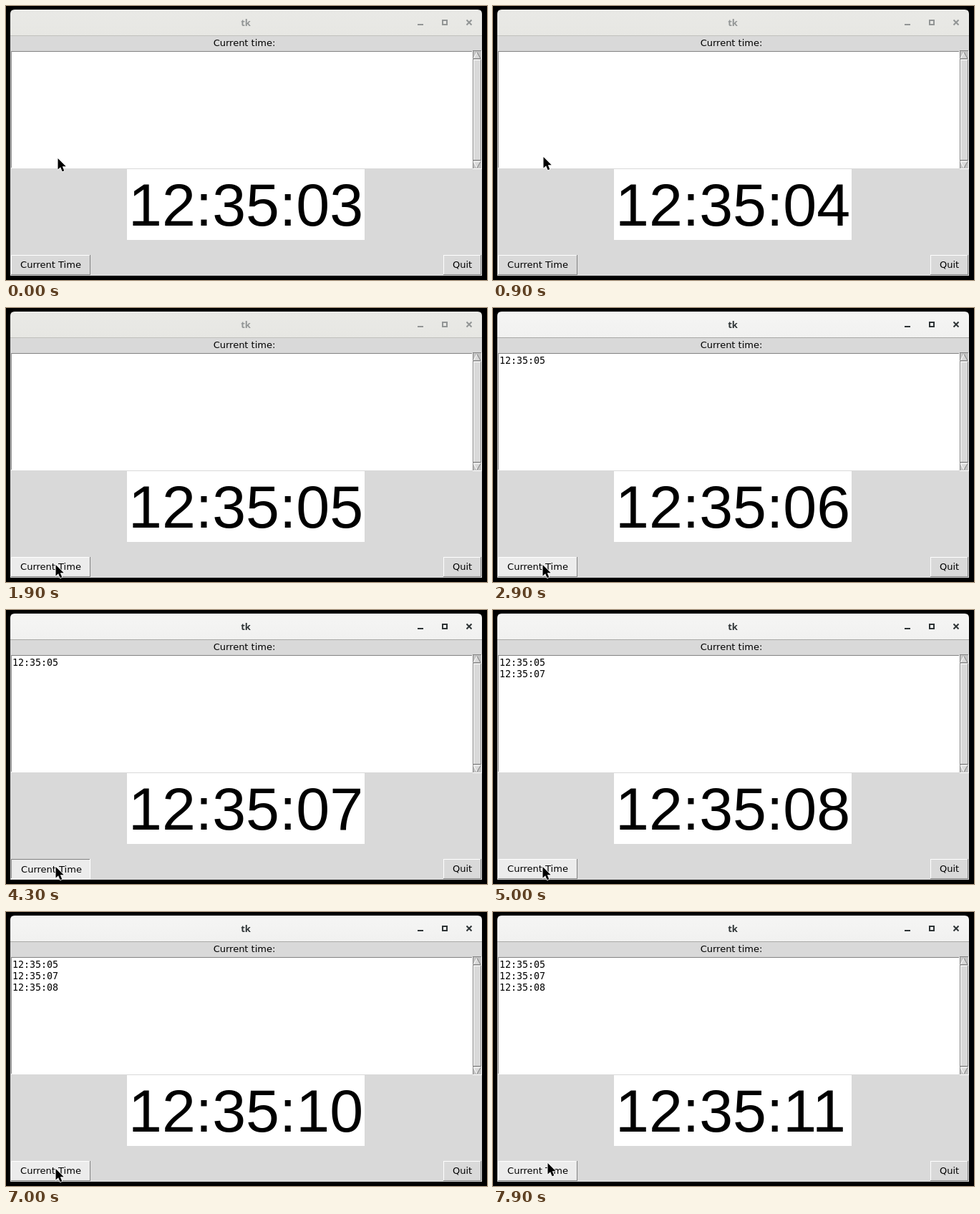
An HTML page that plays this animation: 672 by 383 pixels, repeating every 8 s.

```html
<!DOCTYPE html>
<html lang="en">
<head>
<meta charset="utf-8">
<title>Clock window</title>
<style>
  html, body { margin: 0; width: 100%; height: 100%; overflow: hidden; background: #000; }
  svg { display: block; width: 672px; height: 383px; }
  text { white-space: pre; }
  .ui { font: 13px "DejaVu Sans", Verdana, sans-serif; }
  .title { font: bold 13px "Open Sans", "Noto Sans", sans-serif; }
  .log { font: 13.3px "DejaVu Sans Mono", monospace; }
  .clock { font: 84.3px "Liberation Sans", Arial, sans-serif; }
  .crisp { shape-rendering: crispEdges; }
</style>
</head>
<body>
<svg id="stage" viewBox="0 0 672 383" xmlns="http://www.w3.org/2000/svg">
  <defs>
    <linearGradient id="idle" x2="0" y2="1">
      <stop stop-color="#e9e9e6"/><stop offset="1" stop-color="#e7e7e3"/>
    </linearGradient>
    <linearGradient id="active" x2="0" y2="1">
      <stop stop-color="#f5f5f4"/><stop offset="1" stop-color="#f1f1f0"/>
    </linearGradient>
  </defs>
  <rect width="672" height="383"/>
  <rect class="crisp" x="6" y="41" width="659" height="336" fill="#d9d9d9"/>
  <path id="bar" d="M6 41V11Q6 5 12 5H659Q665 5 665 11V41Z"/>
  <rect id="barLine" class="crisp" x="6" y="41" width="659" height="1"/>
  <g id="barItems">
    <text class="title" x="335" y="28" text-anchor="middle">tk</text>
    <rect class="crisp" x="575" y="25" width="8" height="2"/>
    <path class="crisp" fill-rule="evenodd" d="M609 19h8v8h-8zM611 21v4h4v-4z"/>
    <path id="cross" d="M643.5 19.5l7 7m0-7l-7 7" stroke-width="2"/>
  </g>
  <text class="ui" x="333" y="56" text-anchor="middle">Current time:</text>
  <g id="widgets" class="crisp"></g>
  <g id="log" class="log"></g>
  <rect class="crisp" x="169" y="228" width="332" height="99" fill="#fff"/>
  <text id="clock" class="clock" x="171" y="307"></text>
  <g id="button" class="crisp"></g>
  <text id="label" class="ui" text-anchor="middle">Current Time</text>
  <text class="ui" x="637.5" y="366" text-anchor="middle">Quit</text>
  <path id="cursor" d="M0 0V15.6L3.6 12.3 6.1 18.3 8.8 17.2 6.3 11.3H11.2Z"
        stroke="#fff" stroke-width="1.6" stroke-linejoin="round" paint-order="stroke"/>
</svg>
<script>
const LOOP = 8000;
const FACE = '#d9d9d9', HOVER = '#ececec', LIGHT = '#fff', DARK = '#828282';
const $ = id => document.getElementById(id);

// A bevelled box: light and dark edges swap when it is sunken.
function bevel(x, y, w, h, fill, sunken) {
  const [near, far] = sunken ? [DARK, LIGHT] : [LIGHT, DARK];
  return `<rect x="${x}" y="${y}" width="${w}" height="${h}" fill="${far}"/>
    <rect x="${x}" y="${y}" width="${w - 1}" height="${h - 1}" fill="${near}"/>
    <rect x="${x + 1}" y="${y + 1}" width="${w - 2}" height="${h - 2}" fill="${fill}"/>`;
}

function arrow(tipY, baseY) {
  const down = tipY > baseY;
  return `<g shape-rendering="auto" fill="none">
    <path d="M658 ${tipY}L653 ${baseY}H663Z" fill="${FACE}"/>
    <path d="M658 ${tipY}L653 ${baseY}${down ? 'H663' : ''}" stroke="${LIGHT}"/>
    <path d="M658 ${tipY}L663 ${baseY}${down ? '' : 'H653'}" stroke="${DARK}"/></g>`;
}

$('widgets').innerHTML =
  bevel(7, 63, 645, 164, '#fff', true) +
  bevel(652, 62, 13, 166, '#c3c3c3', true) +
  arrow(64.5, 73.5) + bevel(653, 75, 11, 141, FACE) + arrow(226.5, 217.5) +
  bevel(611, 348, 53, 28, FACE);

const ticks = [900, 1900, 2900, 3900, 5000, 6000, 7000, 7900];
const entries = [[2700, '05'], [4500, '07'], [5700, '08']];
const presses = [[2600, 2700], [4300, 4500]];
const focusAt = 2600;

// time, x, y of the pointer tip; each position holds until the next
const pointer = [
  [0, 72, 213], [500, 70, 206],
  [900, 70, 211], [1000, 71, 230], [1100, 73, 258], [1200, 75, 288], [1300, 76, 310], [1400, 76, 321],
  [1600, 76, 328], [1700, 74, 342], [1800, 70, 356], [1900, 69, 359],
  [7500, 74, 335], [7600, 79, 306], [7800, 79, 328], [7900, 76, 351]
];

$('log').innerHTML = entries.map(([, s], i) =>
  `<text x="9" y="${78 + 16 * i}">12:35:${s}</text>`).join('');

let buttonState = '';
function drawButton(hover, pressed) {
  const state = `${hover} ${pressed}`;
  if (state === buttonState) return;
  buttonState = state;
  $('button').innerHTML = bevel(7, 348, 111, 28, hover ? HOVER : FACE, pressed);
  $('label').setAttribute('x', pressed ? 63.5 : 62.5);
  $('label').setAttribute('y', pressed ? 367 : 366);
}

function render(t) {
  const seconds = 3 + ticks.filter(at => t >= at).length;
  $('clock').textContent = '12:35:' + String(seconds).padStart(2, '0');

  const focused = t >= focusAt;
  const ink = focused ? '#2e3436' : '#929595';
  $('bar').setAttribute('fill', focused ? 'url(#active)' : 'url(#idle)');
  $('barLine').setAttribute('fill', focused ? '#a9a9a6' : '#c0c0bd');
  $('barItems').setAttribute('fill', ink);
  $('cross').setAttribute('stroke', ink);

  entries.forEach(([at], i) =>
    $('log').children[i].setAttribute('visibility', t >= at ? 'visible' : 'hidden'));

  const [, x, y] = pointer.filter(([at]) => t >= at).pop();
  $('cursor').setAttribute('transform', `translate(${x + 0.5} ${y})`);
  drawButton(y >= 348, presses.some(([from, to]) => t >= from && t < to));
}

const start = performance.now();
function frame() {
  render((performance.now() - start) % LOOP);
  requestAnimationFrame(frame);
}
frame();
</script>
</body>
</html>
```
